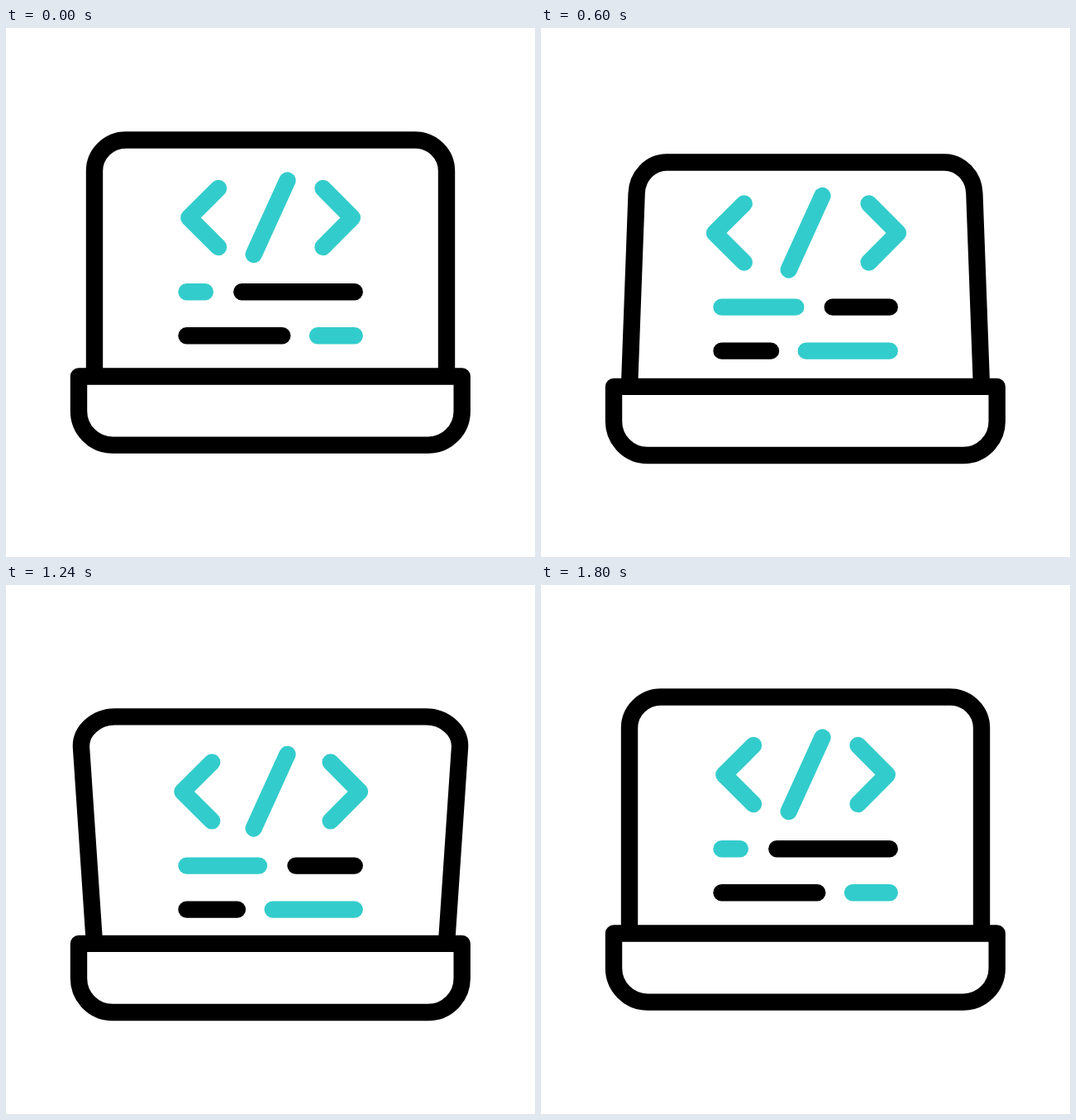
Recreate the animation shown at these times as an HTML page. Size 640 by 640 pixels, loop 2000 ms.

```html
<!DOCTYPE html>
<html lang="en">
<head>
<meta charset="utf-8">
<title>Laptop with code</title>
<style>
  html, body { margin: 0; width: 100%; height: 100%; overflow: hidden; background: #fff; }
  svg { display: block; width: 100vw; height: 100vh; }
  path { fill: none; stroke: #000; stroke-width: 20.4; stroke-linejoin: round; }
  #code path { stroke-linecap: round; }
  #code .teal { stroke: #33cccc; }
</style>
</head>
<body>
<svg viewBox="0 0 640 640">
  <path id="lid"/>
  <path id="base" d="M88 421.5H551.7V463.5A41 41 0 0 1 510.7 504.6H129A41 41 0 0 1 88 463.5Z"/>
  <g id="code">
    <path id="left" class="teal" d="M257 194L221.3 229.5L257 265"/>
    <path id="right" class="teal" d="M383.5 194L418.8 229.5L383.5 265"/>
    <path id="slash" class="teal"/>
    <path id="row1a" class="teal"/>
    <path id="row1b"/>
    <path id="row2a"/>
    <path id="row2b" class="teal"/>
  </g>
</svg>
<script>
const LOOP = 2000, STEP = 40;
const el = id => document.getElementById(id);
const draw = (id, d) => el(id).setAttribute('d', d);
const move = (id, x, y) => el(id).setAttribute('transform', `translate(${x} ${y})`);
const mix = (a, b, p) => a + (b - a) * p;

// cubic-bezier(.5, 0, .5, 1)
function ease(x) {
  if (x <= 0) return 0;
  if (x >= 1) return 1;
  let lo = 0, hi = 1;
  for (let i = 0; i < 24; i++) {
    const t = (lo + hi) / 2;
    if (1.5 * t * (1 - t) + t ** 3 < x) lo = t; else hi = t;
  }
  return lo * lo * (3 - 2 * lo);
}

// Eased value at time t along [time, value] keys
function track(t, ...keys) {
  let value = keys[0][1];
  for (let i = 1; i < keys.length; i++) {
    const [t0, v0] = keys[i - 1], [t1, v1] = keys[i];
    if (t >= t0) value = mix(v0, v1, ease((t - t0) / (t1 - t0)));
  }
  return value;
}

// Lid hinged at the base; lean narrows (+) or widens (-) its top
function drawLid(lean, drop, sink) {
  const hinge = 421.5 + drop;
  const top = hinge - 286 + sink;
  const side = top + 37.5;
  const x = 107 + lean, bend = 145 + lean * 0.82;
  const slope = lean / (hinge - side);
  const cy = side - 20.7, cx = x + 20.7 * slope, ex = bend - 0.55 * (bend - x);
  const r = v => 640 - v;
  draw('lid', `M107 ${hinge}L${x} ${side}C${cx} ${cy} ${ex} ${top} ${bend} ${top}` +
    `H${r(bend)}C${r(ex)} ${top} ${r(cx)} ${cy} ${r(x)} ${side}L533 ${hinge}`);
}

function render(t) {
  const drop = track(t, [40, 0], [920, 16.5], [1800, 0]);
  const lean = track(t, [40, 0], [640, 8.7], [1240, -16], [1800, 0]);
  const spread = track(t, [200, 0], [850, 1], [880, 1], [1600, 0]);
  const swap = track(t, [100, 0], [900, 1], [956, 1], [1684, 0]);
  const ink = track(t, [600, 1], [880, 0], [920, 0], [1200, 1]);
  const back = Math.max(lean, 0) / 8.7, front = Math.max(-lean, 0) / 16;

  drawLid(lean, drop, back * 14.7 + front * 11.5);
  move('base', 0, drop);
  move('code', 0, drop + back * 6.1 + front * 8);
  move('left', -15.7 * spread, 0);
  move('right', 18.3 * spread, 0);

  el('slash').style.display = ink > 0 ? '' : 'none';
  draw('slash', `M299.7 274L${mix(299.7, 340.4, ink)} ${mix(274, 184.5, ink)}`);

  const shift1 = 92 * swap, shift2 = 76.7 * swap;
  draw('row1a', `M218.5 319.2H${240.8 + shift1}`);
  draw('row1b', `M${285.3 + shift1} 319.2H421.7`);
  draw('row2a', `M218.5 372.2H${334.2 - shift2}`);
  draw('row2b', `M${377 - shift2} 372.2H421.7`);
}

const start = performance.now();
function tick() {
  const t = (performance.now() - start) % LOOP;
  render(Math.floor(t / STEP) * STEP);
  requestAnimationFrame(tick);
}
tick();
</script>
</body>
</html>
```
